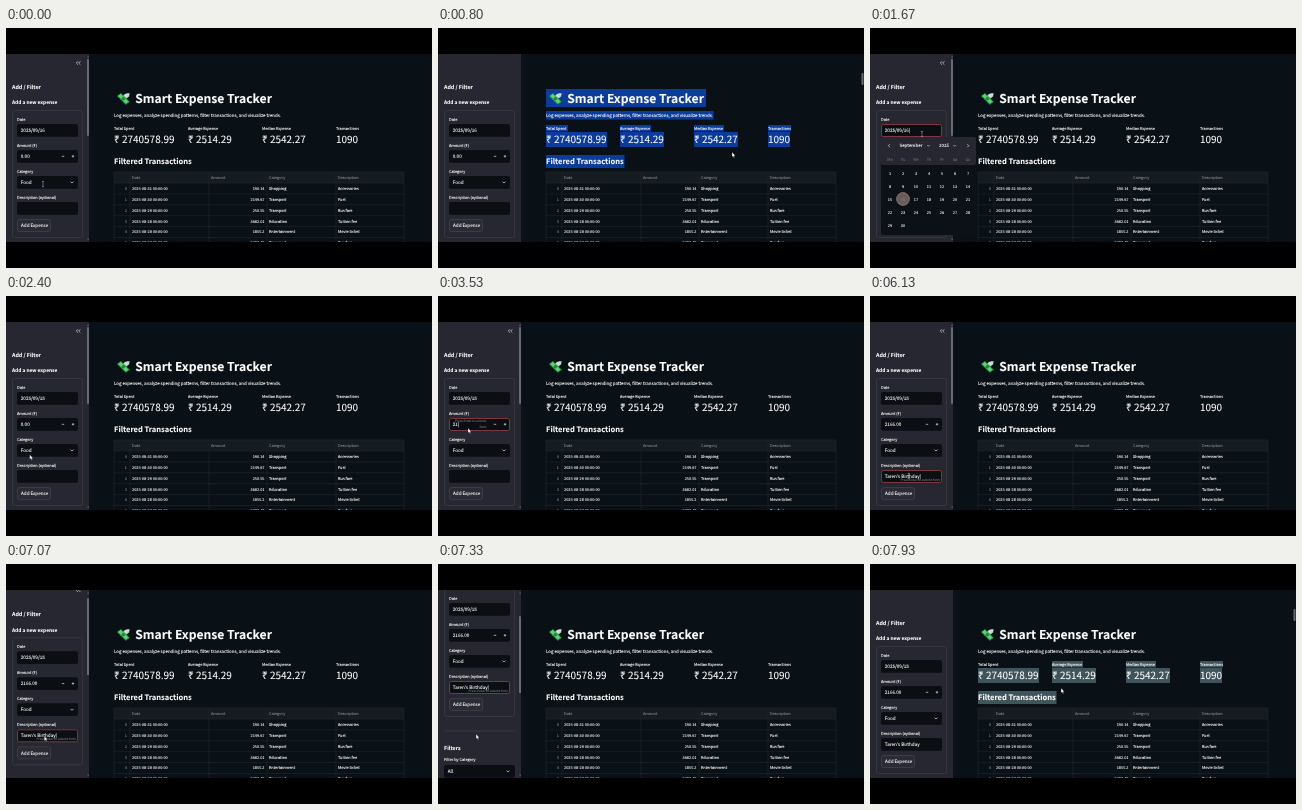
Write an HTML page that moves like this. It is 426x240 px and loops after 8000 ms.

```html
<!DOCTYPE html>
<html lang="en">
<head>
<meta charset="utf-8">
<title>Expense tracker</title>
<style>
  html, body { margin: 0; width: 100%; height: 100%; overflow: hidden; background: #000; }
  svg { display: block; width: 100vw; height: 100vh; }
  text {
    font-family: "Noto Sans CJK JP", "Noto Sans CJK SC", "Noto Sans CJK", "Noto Sans", sans-serif;
    font-size: 3.87px; fill: #fff; stroke: #fff; stroke-width: .1; white-space: pre;
    text-rendering: geometricPrecision;
  }
  .body { font-size: 4.45px; }
  .input { font-size: 4.6px; }
  .bold { font-weight: 700; }
  .muted { fill: #a2a6ac; stroke: none; }
  .hint { font-size: 3.2px; fill: #92949c; stroke: none; }
  .end { text-anchor: end; }
  .mid { text-anchor: middle; }
  .line { fill: none; stroke: #dcdee2; stroke-width: .7; }
  .rule { fill: none; stroke: #252b31; stroke-width: .5; }
  .focus { fill: none; stroke: #98404a; stroke-width: .8; }
</style>
</head>
<body>
<svg viewBox="0 0 426 240" preserveAspectRatio="none">
  <defs><clipPath id="screen"><rect y="26" width="426" height="188"/></clipPath></defs>
  <rect width="426" height="240"/>
  <g id="app" clip-path="url(#screen)"></g>
</svg>
<script>
const LOOP = 8000, FRAME = 200 / 3;
const NOTE = "Taren's Birthday";

const text = (x, y, s, cls = '', size = 0, id = '') =>
  `<text ${id && `id="${id}"`} x="${x}" y="${y}" class="${cls}" ${size ? `style="font-size:${size}px"` : ''}>${s}</text>`;
const rect = (x, y, w, h, fill, r = 0, extra = '') =>
  `<rect x="${x}" y="${y}" width="${w}" height="${h}" rx="${r}" fill="${fill}" ${extra}/>`;
const path = (d, cls = 'line', extra = '') => `<path d="${d}" class="${cls}" ${extra}/>`;
const field = (x, y, w) => rect(x, y, w, 12.8, '#0b0f14', 2);
const focus = (id, y) => rect(11.5, y + .5, 60, 12, 'none', 1.6, `id="${id}" class="focus"`);
const chevron = (x, y, s = 1.5) => path(`M${x - s} ${y - s / 2}l${s} ${s} ${s} ${-s}`);

// Main page
const metrics = [
  [108, 'Total Spent', '₹ 2740578.99', 22, 61],
  [182, 'Average Expense', '₹ 2514.29', 31, 44],
  [256, 'Median Expense', '₹ 2542.27', 30, 44],
  [330, 'Transactions', '1090', 23, 22]
];
const rows = [
  ['2025-08-31', '190.14', 'Shopping', 'Accessories'],
  ['2025-08-30', '2149.67', 'Transport', 'Fuel'],
  ['2025-08-29', '250.55', 'Transport', 'Bus fare'],
  ['2025-08-28', '3682.01', 'Education', 'Tuition fee'],
  ['2025-08-28', '1855.2', 'Entertainment', 'Movie ticket'],
  ['2025-08-27', '2380.48', 'Transport', 'Bus fare']
];

const highlights = rect(108, 61, 160, 18, 'inherit', 0, 'class="top"')
  + rect(108, 83, 167.5, 8.5, 'inherit', 0, 'class="top"')
  + metrics.map(([x, , , labelW, valueW], i) =>
      rect(x, 97, labelW, 6.5, 'inherit', 0, i ? '' : 'class="top"')
      + rect(x, 104, valueW, 15, 'inherit')).join('')
  + rect(108, 127, 78.5, 13, 'inherit');

const money = `<g transform="translate(117.2 70.5)">
  <path d="M-6.3 -2.5L-2.3 -5.6 6.6 3.2 2.6 6.2Z" fill="#1f9a45"/>
  <path d="M-5 -2.4L-2.3 -4.5 5.2 3 2.6 5Z" fill="#5fd36c"/>
  <circle r="1.8" cx=".1" cy=".2" fill="#1c8a3c"/>
  <path d="M.2 -2.8C1 -5 4 -5.8 6.6 -5 6.3 -3.8 5.8 -3.2 6 -2.2 5.2 -1.3 4.4 -1.2 3.4 0Z" fill="#c9dcd3"/></g>`;

const table = rect(108, 144, 290, 11, '#151b21')
  + path('M108 214V144H398V214M124 144V214M203 144V214M261 144V214M330 144V214'
      + rows.map((_, i) => `M108 ${155 + i * 10.9}H398`).join(''), 'rule')
  + [[126, 'Date'], [205, 'Amount'], [263, 'Category'], [332, 'Description']]
      .map(([x, s]) => text(x, 151, s, 'muted')).join('')
  + rows.map(([day, sum, kind, note], i) => {
      const y = 161.8 + i * 10.9;
      return text(121, y, i, 'muted end') + text(126, y, day + ' 00:00:00') + text(258.5, y, sum, 'end')
        + text(263, y, kind) + text(332, y, note);
    }).join('');

const main = rect(0, 26, 426, 188, '#0a1116')
  + `<g id="marks">${highlights}</g>` + money
  + text(129.3, 75.2, 'Smart Expense Tracker', 'bold', 12.15)
  + text(108, 89.2, 'Log expenses, analyze spending patterns, filter transactions, and visualize trends.', 'body')
  + metrics.map(([x, label, value]) => text(x, 102, label) + text(x, 115.3, value, '', 9.98)).join('')
  + text(108, 136.3, 'Filtered Transactions', 'bold', 7.5)
  + table + rect(423.5, 45, 2, 12, '#666b70', 1, 'id="pageBar"');

// Sidebar
const sidebar = rect(0, 26, 83, 188, '#262730') + '<g id="form">'
  + path('M72 33.3l-1.7 1.7 1.7 1.7M74.4 33.3l-1.7 1.7 1.7 1.7', 'line', 'id="collapse"')
  + text(6, 60.8, 'Add / Filter', 'bold', 5.35)
  + text(6, 76.4, 'Add a new expense', 'bold', 4.85)
  + rect(6.5, 82.5, 70, 127, 'none', 2, 'stroke="#41434c" stroke-width=".6"')
  + text(11, 93, 'Date') + field(11, 96, 61) + text(14.8, 104.1, '', 'input', 0, 'date') + focus('dateFocus', 96)
  + text(11, 118.7, 'Amount (₹)') + field(11, 122, 61) + text(14.8, 130.1, '', 'input', 0, 'amount')
  + path('M55.8 128.3h2.4M65.8 128.3h2.4M67 127.1v2.4') + focus('amountFocus', 122)
  + `<g id="amountHint">${text(48.5, 126.4, 'Press Enter to submit', 'hint end')}${text(48.5, 132, 'form', 'hint end')}</g>`
  + text(11, 144.8, 'Category') + field(11, 148, 61) + text(14.8, 156.1, 'Food', 'input') + chevron(66, 154.3)
  + text(11, 170.7, 'Description (optional)') + field(11, 174, 61)
  + text(70, 184.6, 'Press Enter to submit form', 'hint end', 0, 'noteHint')
  + text(14.8, 182.1, '', 'input', 0, 'note') + focus('noteFocus', 174)
  + rect(11.5, 191.5, 33, 12, '#2a2b35', 2, 'stroke="#484a53" stroke-width=".6"')
  + text(15, 199.3, 'Add Expense', 'input')
  + path('M6 224H77', 'rule', 'style="stroke:#484a53"')
  + text(6, 243, 'Filters', 'bold', 5.35) + text(6, 254, 'Filter by Category')
  + field(6, 258, 71) + text(9.8, 266, 'All', 'input') + chevron(70, 264.3)
  + '</g><g id="sideBar">' + rect(81.1, 31, 1.8, 77, '#73747b', .9, 'id="thumb"')
  + '<path d="M81.2 29.6l.9 -1.3 .9 1.3ZM81.2 210.8l.9 1.3 .9 -1.3Z" fill="#85868c"/></g>';

// Date picker
const column = i => 20 + (i % 7) * 13;
const calendar = '<g id="calendar">' + rect(11, 109, 95, 98, '#0c1117', 2) + rect(11, 109, 95, 28, '#262730', 2)
  + path('M19.8 116.2l-1.5 1.5 1.5 1.5M97.3 116.2l1.5 1.5 -1.5 1.5')
  + text(29.5, 119.2, 'September', 'body') + chevron(58.5, 117.7, 1.1)
  + text(69, 119.2, '2025', 'body') + chevron(84.5, 117.7, 1.1)
  + '<g opacity=".28">' + ['Mo', 'Tu', 'We', 'Th', 'Fr', 'Sa', 'Su'].map((d, i) =>
      text(column(i), 132.8, d, 'mid')).join('') + '</g>'
  + Array.from({ length: 30 }, (_, i) =>
      text(column(i), 146.5 + Math.floor(i / 7) * 13, i + 1, 'mid')).join('')
  + '<circle id="day" cy="171" r="6.4" fill="#75666c" fill-opacity=".88" stroke="#a58672" stroke-width=".7"/>'
  + '</g>';

const pointer = `<g id="mouse">
  <path id="arrow" d="M0 -2V3L1.1 2 1.9 3.7 2.7 3.3 2 1.7H3.4Z" fill="#fff" stroke="#111" stroke-width=".35"/>
  <path id="beam" d="M-1.1 -2.6H1.1M0 -2.6V2.6M-1.1 2.6H1.1" class="line" style="stroke:#b9bbc0;stroke-width:.5"/></g>`;

document.getElementById('app').innerHTML = main + sidebar + calendar + pointer;
const $ = Object.fromEntries([...document.querySelectorAll('[id]')].map(e => [e.id, e]));
const tops = document.querySelectorAll('.top');

// Timeline: [ms, values...]
const mousePath = [
  [0, 37, 156], [130, 40, 154], [530, 270, 122], [800, 294, 126], [1000, 286, 125], [1400, 62, 103],
  [1670, 52, 106], [1870, 44, 135], [2130, 21, 171], [2270, 21, 171], [2670, 32, 129], [3530, 30, 134],
  [3930, 31, 135], [4270, 38, 180], [6930, 39, 180], [7130, 38, 172], [7530, 38, 172], [7930, 191, 126], [8000, 195, 125]
];
const scrollPath = [[0, 0], [7000, 0], [7270, 57], [7470, 57], [7670, 0], [8000, 0]];
const amounts = [[0, '0.00'], [3130, ''], [3260, '2'], [3460, '21'], [3730, '216'], [3900, '2166'], [4250, '2166.00']];

const between = (t, a, b) => t >= a && t < b;
const show = (el, on) => el.setAttribute('visibility', on ? 'visible' : 'hidden');
const latest = (steps, t) => steps.filter(s => s[0] <= t).pop()[1];
function tween(keys, t) {
  const i = Math.max(1, keys.findIndex(k => k[0] > t));
  const [a, b] = [keys[i - 1], keys[i]];
  const p = (t - a[0]) / (b[0] - a[0]), e = p * p * (3 - 2 * p);
  return a.slice(1).map((v, j) => v + (b[j + 1] - v) * e);
}

function render(t) {
  const [x, y] = tween(mousePath, t), [scroll] = tween(scrollPath, t);
  const inMain = x > 83;
  const dateOn = between(t, 1460, 2260), amountOn = between(t, 2790, 4250), noteOn = between(t, 4250, 7860);
  const caret = on => on ? '|' : '';

  $.mouse.setAttribute('transform', `translate(${x} ${y})`);
  const overText = !inMain && (t < 300 || between(t, 1400, 1800) || between(t, 4200, 7000));
  show($.beam, overText);
  show($.arrow, !overText);

  $.form.setAttribute('transform', `translate(0 ${-scroll})`);
  $.thumb.setAttribute('y', 31 + scroll * .37);
  show($.sideBar, !inMain);
  show($.collapse, !inMain);
  show($.pageBar, inMain);

  $.date.textContent = (t < 2190 ? '2025/09/16' : '2025/09/15') + caret(dateOn);
  $.amount.textContent = latest(amounts, t) + caret(amountOn);
  const typed = Math.max(0, Math.floor((t - 4530) / 90));
  $.note.textContent = NOTE.slice(0, typed) + caret(noteOn);
  show($.dateFocus, dateOn);
  show($.amountFocus, amountOn);
  show($.noteFocus, noteOn);
  show($.amountHint, amountOn && t >= 3130);
  show($.noteHint, noteOn && typed > 0);

  show($.calendar, dateOn);
  $.day.setAttribute('cx', t < 2190 ? 33 : 20);

  const firstDrag = between(t, 590, 1060), lastDrag = t >= 7860;
  show($.marks, firstDrag || lastDrag);
  $.marks.style.fill = firstDrag ? '#0b3c9c' : '#40545b';
  tops.forEach(el => show(el, between(t, 660, 1060)));
}

const start = performance.now();
function tick() {
  const t = (performance.now() - start) % LOOP;
  render(Math.floor((t + 5) / FRAME) * FRAME % LOOP);
  requestAnimationFrame(tick);
}
tick();
</script>
</body>
</html>
```
